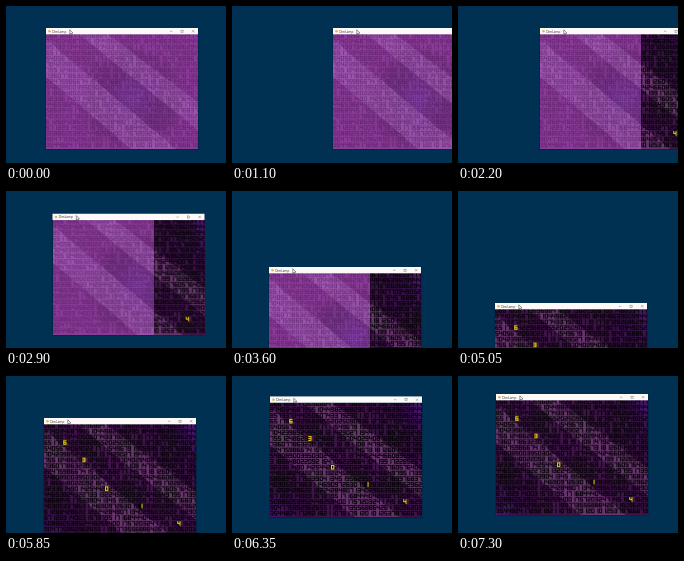
An HTML page with a canvas for the animation above (7.4 s loop, 220x157 px).

```html
<!DOCTYPE html>
<html lang="en">
<head>
<meta charset="utf-8">
<title>Dragged window</title>
<style>
html, body { margin: 0; width: 100%; height: 100%; overflow: hidden; background: #003052; }
canvas { display: block; width: 220px; height: 157px; }
</style>
</head>
<body>
<canvas id="stage" width="220" height="157"></canvas>
<script>
const ctx = document.getElementById('stage').getContext('2d');
ctx.imageSmoothingQuality = 'high';

const LOOP = 7400, STEP = 50;
const WIN = { w: 152, h: 120.8, bar: 6.3 };
const BODY_H = WIN.h - WIN.bar;
const COL = 3.8, ROW = 5.75, SCALE = 4;
const OFF_RIGHT = 1500, OFF_BOTTOM = 4500;

// [time, position] keys, joined by monotone curves
const pathX = [[0, 40], [750, 79], [1100, 101], [1470, 119], [1550, 119], [2200, 82],
  [3000, 44], [3600, 37], [4500, 35], [5050, 37], [5850, 38], [LOOP, 38]];
const pathY = [[0, 22], [2250, 22], [3000, 23], [3600, 76], [3750, 92.5], [4500, 151],
  [5050, 112], [5250, 96], [5850, 42], [6000, 35], [6500, 18], [LOOP, 18]];

function follow(keys, t) {
  const slope = i => (keys[i + 1][1] - keys[i][1]) / (keys[i + 1][0] - keys[i][0]);
  const tangent = i => {
    if (i === 0 || i === keys.length - 1) return 0;
    const a = slope(i - 1), b = slope(i);
    return a * b <= 0 ? 0 : 2 * a * b / (a + b);
  };
  let i = 0;
  while (i < keys.length - 2 && t >= keys[i + 1][0]) i++;
  const [t0, p0] = keys[i], [t1, p1] = keys[i + 1];
  const d = t1 - t0, u = (t - t0) / d, v = 1 - u;
  return v * v * (1 + 2 * u) * p0 + u * u * (3 - 2 * u) * p1
    + d * u * v * (v * tangent(i) - u * tangent(i + 1));
}

function seededRandom(seed) {
  return () => (seed = (seed * 16807) % 2147483647) / 2147483647;
}

function polygon(c, points, color) {
  c.fillStyle = color;
  c.beginPath();
  points.forEach(([x, y]) => c.lineTo(x, y));
  c.closePath();
  c.fill();
}

// Seven-segment digits: top, upper right, lower right, bottom, lower left, upper left, middle
const SEGMENTS = [[0, 0, 1, 0], [1, 0, 1, 1], [1, 1, 1, 2], [0, 2, 1, 2],
  [0, 1, 0, 2], [0, 0, 0, 1], [0, 1, 1, 1]];
const DIGITS = ['012345', '12', '01643', '01623', '5612', '05623', '054326', '012', '0123456', '650123'];

function drawDigit(c, digit, cx, cy, color, width) {
  const w = 2.3, h = 1.85;
  c.strokeStyle = color;
  c.lineWidth = width;
  c.lineCap = 'square';
  c.beginPath();
  for (const s of DIGITS[digit]) {
    const [x0, y0, x1, y1] = SEGMENTS[s];
    c.moveTo(cx + (x0 - 0.5) * w, cy + (y0 - 1) * h);
    c.lineTo(cx + (x1 - 0.5) * w, cy + (y1 - 1) * h);
  }
  c.stroke();
}

const rowY = r => 1.2 + r * ROW;
const code = [[6, 5, 3], [3, 10, 6], [0, 16, 11], [1, 25, 14], [4, 35, 17]];

function makeBody(look) {
  const canvas = document.createElement('canvas');
  canvas.width = WIN.w * SCALE;
  canvas.height = Math.round(BODY_H * SCALE);
  const c = canvas.getContext('2d');
  c.scale(SCALE, SCALE);
  c.fillStyle = look.base;
  c.fillRect(0, 0, WIN.w, BODY_H);

  for (const [x, y, r] of look.glows) {
    const glow = c.createRadialGradient(x, y, 0, x, y, r);
    glow.addColorStop(0, look.glow);
    glow.addColorStop(1, 'transparent');
    c.fillStyle = glow;
    c.fillRect(0, 0, WIN.w, BODY_H);
  }
  polygon(c, [[33, 0], [62, 0], [152, 68], [152, 96]], look.band);
  polygon(c, [[0, 5], [0, 42], [85, BODY_H], [130, BODY_H]], look.band);

  const random = seededRandom(4711);
  for (let r = 0; r < 20; r++) {
    for (let col = 0; col < 40; col++) {
      const digit = Math.floor(random() * 10);
      const lit = code.some(([, a, b]) => a === col && b === r);
      if (!lit || !look.code) {
        drawDigit(c, digit, (col + 0.5) * COL, rowY(r), look.ink, look.line);
      }
    }
  }
  if (look.code) {
    for (const [digit, col, r] of code) {
      const x = (col + 0.5) * COL, y = rowY(r);
      c.fillStyle = '#08020a';
      c.fillRect(x - 2.1, y - 2.8, 4.2, 5.6);
      drawDigit(c, digit, x, y, look.code, 1.05);
    }
  }
  return canvas;
}

const washed = makeBody({
  base: '#8a3b97', band: 'rgba(176,108,196,.5)', glow: 'rgba(132,72,190,.55)',
  glows: [[85, 66, 55]], ink: 'rgba(62,14,76,.5)', line: 0.75
});
const clear = makeBody({
  base: '#3f1449', band: 'rgba(132,76,134,.58)', glow: 'rgba(82,24,130,.75)',
  glows: [[152, 8, 60], [0, 112, 50]], ink: '#060108', line: 0.95, code: '#f2d21c'
});

function drawBody(time) {
  const seam = time >= OFF_BOTTOM ? 0 : time >= OFF_RIGHT ? 101 : WIN.w;
  const part = (image, from, to) => {
    if (to <= from) return;
    ctx.drawImage(image, from * SCALE, 0, (to - from) * SCALE, image.height,
      from, WIN.bar, to - from, BODY_H);
  };
  part(washed, 0, seam);
  part(clear, seam, WIN.w);
}

function drawTitleBar() {
  ctx.fillStyle = '#fbfaf9';
  ctx.fillRect(0, 0, WIN.w, WIN.bar);
  ctx.fillStyle = '#e9b73c';
  ctx.beginPath();
  ctx.arc(3.5, 3.3, 1.3, 0, 7);
  ctx.fill();
  ctx.fillStyle = '#333';
  ctx.font = '3.1px "Open Sans", sans-serif';
  ctx.fillText('DimLamp', 6.3, 4.5);

  ctx.strokeStyle = '#666';
  ctx.lineWidth = 0.45;
  ctx.strokeRect(135, 2.2, 2.1, 2.1);
  ctx.beginPath();
  ctx.moveTo(124, 3.3); ctx.lineTo(126.3, 3.3);
  ctx.moveTo(146, 2.1); ctx.lineTo(148.3, 4.4);
  ctx.moveTo(148.3, 2.1); ctx.lineTo(146, 4.4);
  ctx.stroke();
}

function drawCursor(x, y) {
  const arrow = [[0, 0], [0, 4.4], [1, 3.5], [1.7, 5], [2.4, 4.7], [1.8, 3.3], [3.1, 3.2]]
    .map(([a, b]) => [x + a, y + b]);
  polygon(ctx, arrow, '#fff');
  ctx.strokeStyle = '#333';
  ctx.lineWidth = 0.5;
  ctx.stroke();
}

function drawFrame(time) {
  ctx.setTransform(1, 0, 0, 1, 0, 0);
  ctx.fillStyle = '#003052';
  ctx.fillRect(0, 0, 220, 157);
  ctx.translate(follow(pathX, time), follow(pathY, time));
  ctx.fillStyle = 'rgba(0,15,35,.35)';
  ctx.fillRect(-0.5, 0.5, WIN.w + 1, WIN.h + 0.5);
  drawBody(time);
  drawTitleBar();
  drawCursor(23.8, 1.8);
}

function tick() {
  drawFrame(Math.floor(performance.now() % LOOP / STEP) * STEP);
  requestAnimationFrame(tick);
}
tick();
</script>
</body>
</html>
```
